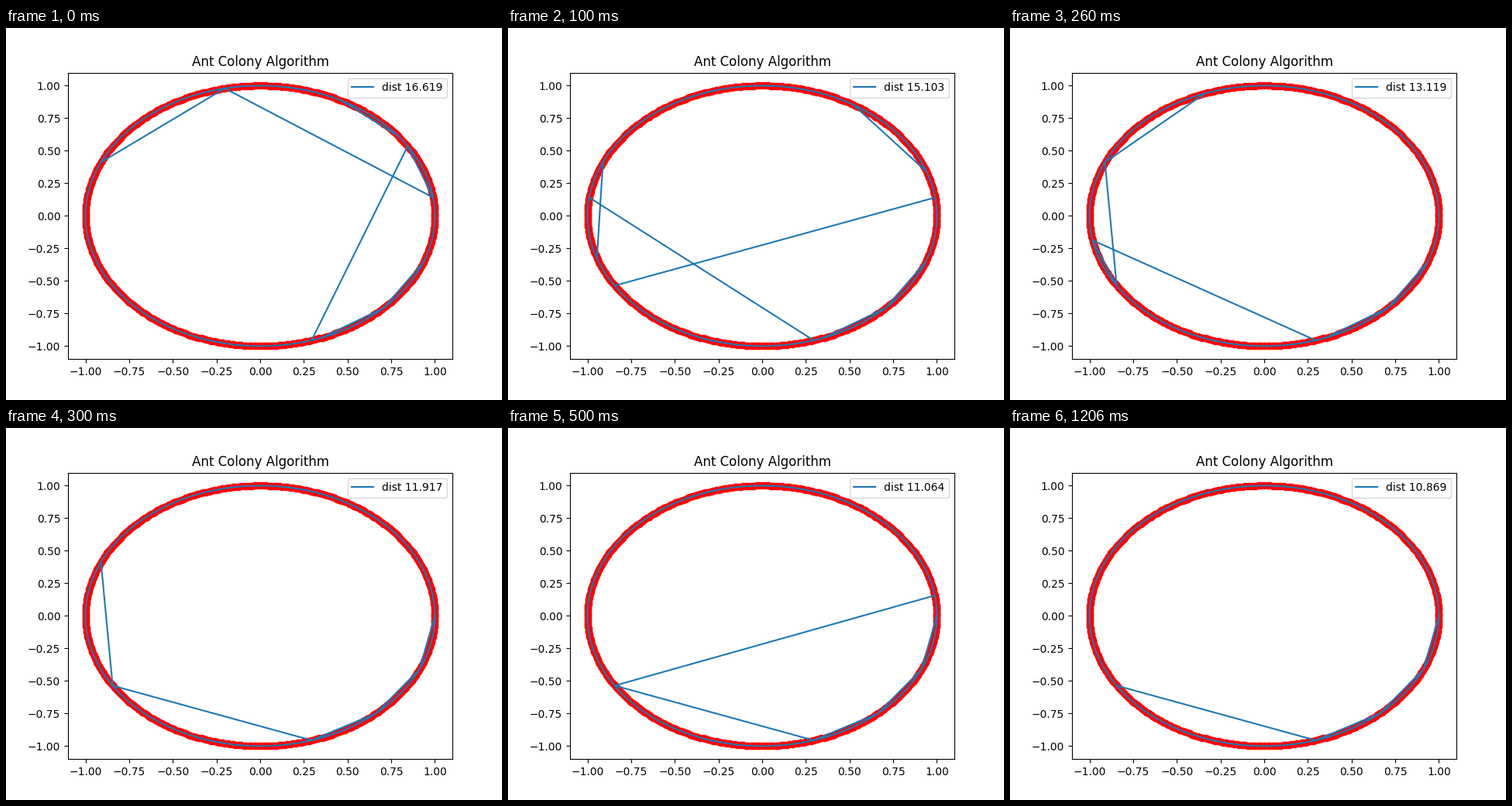
These frames come from a looping animation (640x480 px, 1610 ms). A matplotlib script:

```python
import numpy as np
import matplotlib.pyplot as plt
from matplotlib.animation import FuncAnimation

plt.rcParams["font.family"] = "DejaVu Sans"

CITIES = 400
TICK_MS = 10
STEP_MS = 100
LOOP_MS = 1610

# Cities where long hops start or end, in degrees.
EAST, NORTH_EAST, NORTH = 8.1, 32.4, 101.7
NORTH_WEST, SOUTH_WEST, SOUTH = 155.7, 212.4, 287.1
STRIDE = 24.3


def points(degrees):
    a = np.radians(degrees)
    return np.column_stack([np.cos(a), np.sin(a)])


def skips(start, count=1):
    """Short hops that cut along the inside of the ring."""
    return start + STRIDE * np.arange(count + 1)


# The two main phases: scattered crossings, then one corner left to fix.
early = skips(290.7, 2)
late = skips(SOUTH, 3)
corner = [SOUTH_WEST, SOUTH]

TOURS = [
    (16.619, [early, skips(37.8),
              [NORTH_WEST, NORTH, EAST, NORTH_EAST, SOUTH]]),
    (15.103, [early, [180 - EAST, SOUTH], [EAST, SOUTH_WEST],
              [NORTH_WEST, 198.9], [19.8, 58.5]]),
    (13.119, [early, [109.8, NORTH_WEST, SOUTH_WEST, 190.8, SOUTH]]),
    (11.917, [late, [NORTH_WEST] + corner]),
    (11.854, [late, [NORTH_WEST] + corner]),
    (11.064, [late, [EAST + 0.9] + corner]),
    (10.869, [late, corner]),
]

ring = points(np.linspace(0, 360, CITIES + 1))
gap = np.full((1, 2), np.nan)


def route(chains):
    """The ring of neighbouring cities followed by each chain of hops."""
    parts = [ring]
    for chain in chains:
        parts += [gap, points(chain)]
    return np.vstack(parts)


fig, ax = plt.subplots(figsize=(6.4, 4.8), dpi=100)
ax.plot(ring[:, 0], ring[:, 1], "o", color="red")
line, = ax.plot([], [], color="#1f77b4", lw=1.5, label="dist 00.000")
ax.set(xlim=(-1.1, 1.1), ylim=(-1.1, 1.1), title="Ant Colony Algorithm")
label = ax.legend(loc="upper right").get_texts()[0]


def update(frame):
    step = min(frame * TICK_MS // STEP_MS, len(TOURS) - 1)
    dist, chains = TOURS[step]
    line.set_data(*route(chains).T)
    label.set_text(f"dist {dist:.3f}")
    return line, label


anim = FuncAnimation(fig, update, frames=LOOP_MS // TICK_MS,
                     interval=TICK_MS, repeat=True, repeat_delay=0)
plt.show()
```
